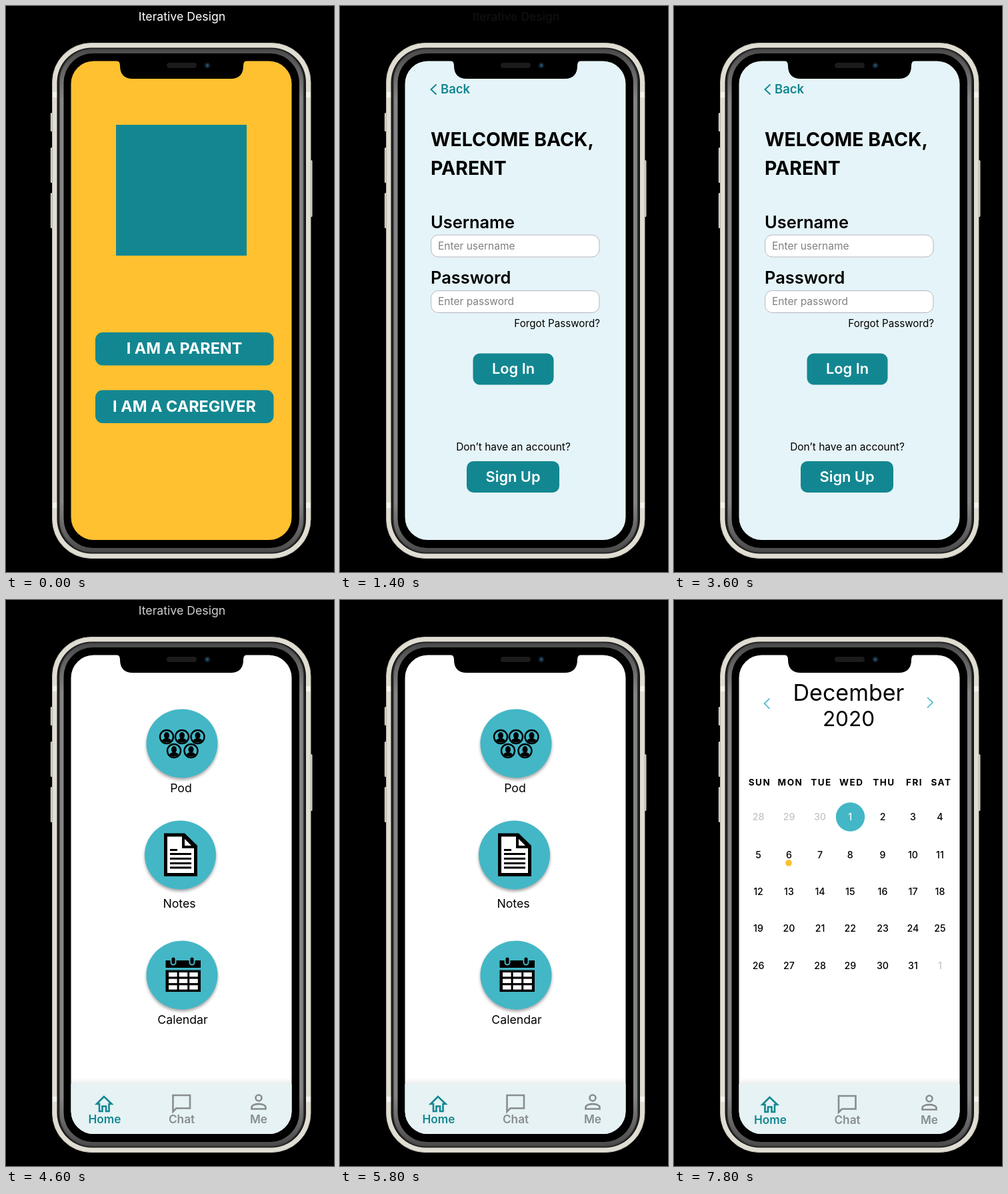
Recreate the animation shown at these times as an HTML page. Size 492 by 848 pixels, loop 8000 ms.

```html
<!DOCTYPE html>
<html lang="en">
<head>
<meta charset="utf-8">
<title>Iterative Design</title>
<style>
  html, body { margin: 0; width: 100%; height: 100%; overflow: hidden; background: #000; }
  svg { display: block; width: 100%; height: 100%; font-family: Inter, "Open Sans", sans-serif; }
  .disc { filter: drop-shadow(0 3px 2px rgba(0, 0, 0, .35)); }
  .line { fill: none; stroke-width: 2.6; }
</style>
</head>
<body>
<svg id="stage" viewBox="0 0 492 848">
  <defs>
    <clipPath id="glass"><rect x="97.5" y="82.5" width="331" height="717.5" rx="34"/></clipPath>
    <linearGradient id="metal" x2="0" y2="1">
      <stop offset="0" stop-color="#4a4a4a"/><stop offset=".1" stop-color="#858585"/>
      <stop offset=".9" stop-color="#858585"/><stop offset="1" stop-color="#4a4a4a"/>
    </linearGradient>
    <linearGradient id="shade" x2="0" y2="1">
      <stop offset="0" stop-color="#000" stop-opacity="0"/><stop offset="1" stop-color="#000" stop-opacity=".07"/>
    </linearGradient>
  </defs>
</svg>
<script>
const TEAL = '#138791', AQUA = '#43b7c6', GREY = '#888c8f';
const LOOP = 8000, STEP = 200;

const rect = (x, y, w, h, r, fill, extra = '') =>
  `<rect x="${x}" y="${y}" width="${w}" height="${h}" rx="${r}" fill="${fill}" ${extra}/>`;
const text = (x, y, size, str, { fill = '#000', weight = 400, anchor = 'middle', extra = '' } = {}) =>
  `<text x="${x}" y="${y}" font-size="${size}" fill="${fill}" font-weight="${weight}" text-anchor="${anchor}" ${extra}>${str}</text>`;
const line = (d, color, extra = '') => `<path class="line" d="${d}" stroke="${color}" ${extra}/>`;
const group = (id, body) => `<g id="${id}">${body}</g>`;
const page = fill => rect(97, 82, 332, 718, 0, fill);

function phone() {
  const edge = '#d0cdc3', band = '#f3f1ea';
  const keys = [[66.8, 160, 28], [66.8, 212, 53], [66.8, 280, 53], [455.5, 231, 85]];
  return keys.map(([x, y, h]) => rect(x, y, 4, h, 1.5, edge)).join('') +
    rect(69.5, 55.5, 387.5, 772, 58.5, '#e0ddd3', 'stroke="#bbb8ae"') +
    [129, 744].map(y => rect(70, y, 7, 8, 0, band) + rect(449.5, y, 7, 8, 0, band)).join('') +
    rect(76.5, 62.5, 373.5, 758, 52, '#181818') +
    rect(80, 64.5, 366.5, 754, 49, 'url(#metal)', 'stroke="#3a3a3a" stroke-width="1.5"') +
    rect(86.5, 71, 353.5, 741, 44, '#000');
}

function notch() {
  return `<path d="M166 82 Q171 83 171 89 Q171 109 190 109 H337 Q356 109 356 89 Q356 83 361 82Z"/>` +
    rect(241, 85, 45, 8, 4, '#1b1b1b') +
    `<circle cx="302" cy="89" r="4.5" fill="#0f1d27"/><circle cx="302" cy="89" r="2.2" fill="#22506b"/>`;
}

function welcome() {
  const button = (y, label) => rect(134, y, 267.5, 49.5, 11, TEAL) +
    text(267.5, y + 32, 23.4, label, { fill: '#fff', weight: 700 });
  return page('#ffc12f') + rect(165, 178, 196, 196, 0, TEAL) +
    button(489, 'I AM A PARENT') + button(575.5, 'I AM A CAREGIVER');
}

function login() {
  const left = { anchor: 'start' };
  const field = (y, name) =>
    text(136, y - 10.5, 25.4, name, { ...left, weight: 600 }) +
    rect(136.5, y, 252.5, 33, 11, '#fff', 'stroke="#b4b6bd"') +
    text(147, y + 21.5, 15.5, 'Enter ' + name.toLowerCase(), { ...left, fill: '#808080' });
  const button = (x, y, w, label) => rect(x, y, w, 47, 10, TEAL) +
    text(x + w / 2, y + 30.5, 21.8, label, { fill: '#fff', weight: 600 });
  return page('#e5f4f8') +
    line('M144.5 117.5 l-8 7.5 l8 7.5', TEAL, 'style="stroke-width:2"') +
    text(151, 131, 18.5, 'Back', { ...left, fill: TEAL, weight: 600 }) +
    text(136, 210, 28.4, 'WELCOME BACK,', { ...left, weight: 700 }) +
    text(136, 253, 28.4, 'PARENT', { ...left, weight: 700 }) +
    field(343, 'Username') + field(426.5, 'Password') +
    text(390, 481, 15.2, 'Forgot Password?', { anchor: 'end' }) +
    button(199.5, 520.5, 121, 'Log In') +
    text(260, 666, 15.5, 'Don’t have an account?') +
    button(190, 682, 139, 'Sign Up');
}

function home() {
  const disc = (x, y) => `<ellipse class="disc fade" cx="${x}" cy="${y}" rx="53.5" ry="51.5" fill="${AQUA}"/>`;
  const icon = body => `<g class="fade">${body}</g>`;
  const label = (x, y, str, id = '') => text(x, y, 17.7, str, { extra: `class="fade" ${id}` });
  const person = ([x, y]) => `<g transform="translate(${x} ${y})">
    <circle r="10" fill="none" stroke="#000" stroke-width="2.4"/>
    <ellipse cy="-2" rx="4" ry="5"/><path d="M-7 6 Q-5 2 0 2 Q5 2 7 6 Q0 11 -7 6Z"/></g>`;

  const people = [[241, 205], [264, 205], [287.5, 205], [252, 226], [277.5, 226]].map(person).join('');
  const sheet = rect(234, 345, 61, 70, 0, AQUA) +
    '<path d="M239.5 352 H267 L284.5 369 V411.5 H239.5Z" fill="#fff" stroke="#000" stroke-width="5"/>' +
    '<path d="M264 352 V372 H285 L267 352Z"/><path d="M268 358 V368 H278Z" fill="#fff"/>' +
    rect(246, 373, 11, 3, 0, '#000') +
    [379, 386, 393, 399.5].map(y => rect(246, y, 32, 3, 0, '#000')).join('');
  let grid = rect(233, 525, 64, 65, 0, AQUA) +
    rect(239.5, 540, 52.5, 11, 0, '#000') + rect(239.5, 554.5, 52.5, 32.5, 0, '#000');
  for (const x of [251, 279]) grid += rect(x - 3.5, 534.5, 7, 12, 3.5, '#000', `stroke="${AQUA}" stroke-width="2"`);
  for (let i = 0; i < 9; i++)
    grid += rect(244 + i % 3 * 15.6, 558 + Math.floor(i / 3) * 9.6, 12.6, 6.4, 0, '#fff');

  return page('#fff') +
    disc(264, 215) + icon(people) + label(262.5, 288, 'Pod') +
    disc(261.5, 382) + icon(sheet) + label(260, 461, 'Notes') +
    label(265, 635, 'Calendar', 'id="tag"') + disc(264, 562) + icon(grid);
}

function nav() {
  const tab = (id, str, color, shape) =>
    group(id, shape + text(0, 783.5, 17.2, str, { fill: color, weight: 600 }));
  return rect(97, 716, 332, 9, 0, 'url(#shade)') + rect(97, 725, 332, 75, 0, '#e6f2f4') +
    tab('tab0', 'Home', TEAL, line('M-1 744 L-12 755 H-8 V766 H-3.5 V758.5 H2 V766 H6.5 V755 H10.5Z', TEAL)) +
    tab('tab1', 'Chat', GREY, line('M-13 742 H12.5 V761.5 H-8 L-13 766.5Z', GREY)) +
    tab('tab2', 'Me', GREY, `<circle class="line" cy="746" r="4.5" stroke="${GREY}"/>` +
      line('M-10.5 762.5 V760 C-10.5 753.5 10.5 753.5 10.5 760 V762.5Z', GREY));
}

function month() {
  const cols = [126.5, 172.5, 219, 264.3, 313, 358.5, 399], rows = [325, 382, 436.5, 491.5, 547.5];
  let out = text(262, 151, 34, 'December') + text(262, 189, 31.5, '2020') +
    line('M143.5 147.5 l-8 7.5 l8 8', AQUA, 'style="stroke-width:1.7"') +
    line('M380 146 l8 7.5 l-8 8', AQUA, 'style="stroke-width:1.7"') +
    `<circle cx="264.5" cy="325" r="21.7" fill="${AQUA}"/><circle cx="172" cy="394" r="4.8" fill="#fcbf2f"/>`;
  ['SUN', 'MON', 'TUE', 'WED', 'THU', 'FRI', 'SAT'].forEach((day, i) =>
    out += text(cols[i] + 2, 277.5, 13.5, day, { weight: 700, extra: 'letter-spacing="1.5"' }));
  for (let i = 0; i < 35; i++) {
    const n = i - 2, outside = n < 1 || n > 31;
    out += text(cols[i % 7], rows[Math.floor(i / 7)] + 5, 14.2, n < 1 ? n + 30 : n > 31 ? n - 31 : n,
      { fill: outside ? '#c4c4c4' : n === 1 ? '#fff' : '#000', weight: 500 });
  }
  return out;
}

const stage = document.getElementById('stage');
stage.innerHTML += text(264, 22, 17.7, 'Iterative Design', { fill: '#fff', extra: 'id="title"' }) + phone() +
  `<g clip-path="url(#glass)">${group('welcome', welcome())}${group('login', login())}` +
  group('main', home() + nav() + group('month', month())) + '</g>' + notch();

const get = id => document.getElementById(id);
const fading = [...document.querySelectorAll('.fade')];
const ramp = (t, from, to) => Math.min(1, Math.max(0, (t - from) / (to - from)));
const ease = u => u < .5 ? 4 * u ** 3 : 1 - 4 * (1 - u) ** 3;
const show = (id, on) => get(id).style.display = on ? '' : 'none';
const move = (id, x, y) => get(id).setAttribute('transform', `translate(${x} ${y})`);

function draw(t) {
  show('welcome', t < 1400);
  show('login', t >= 1400 && t < 4600);
  show('main', t >= 4600);
  get('title').style.opacity = t < 3600 ? 1 - ramp(t, 1200, 1415) : ramp(t, 3600, 4200) - ramp(t, 4530, 4900);

  // The month slides in along the path the label leaves by.
  const p = ease(ramp(t, 6640, 7620)), dx = 174, dy = 533;
  for (const el of fading) el.style.opacity = 1 - p;
  move('tag', -dx * p, -dy * p);
  move('month', dx * (1 - p), dy * (1 - p));
  get('month').style.opacity = p;
  [[148, -3.5], [263.5, -3.5], [379, 4]].forEach(([x, d], i) => move('tab' + i, x + d * p, p));
}

const start = performance.now();
function tick() {
  const t = (performance.now() - start) % LOOP;
  draw(Math.floor(t / STEP) * STEP);
  requestAnimationFrame(tick);
}
tick();
</script>
</body>
</html>
```
